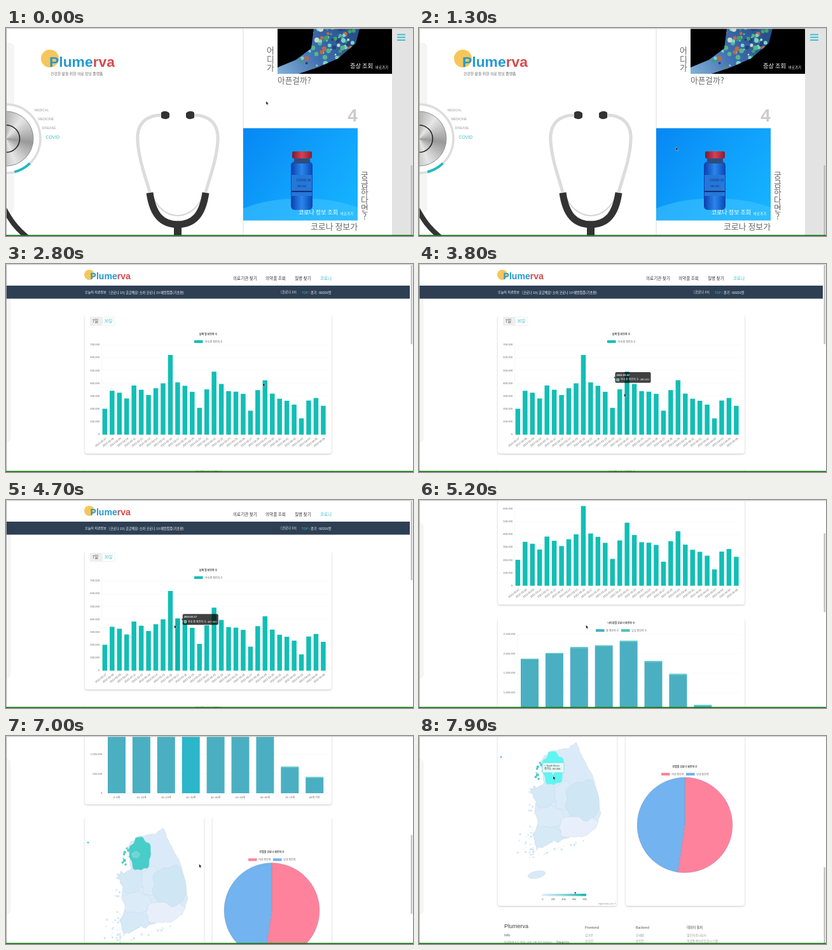
An HTML page with a canvas for the animation above (8 s loop, 640 by 327 pixels).

```html
<!DOCTYPE html>
<html lang="ko">
<head>
<meta charset="utf-8">
<title>Health dashboard</title>
<style>
html, body { margin: 0; width: 100%; height: 100%; overflow: hidden; background: #fff; }
canvas { display: block; width: 640px; height: 327px; }
</style>
</head>
<body>
<canvas id="stage"></canvas>
<script>
const W = 640, H = 327, LOOP = 8000;
const PAGE_AT = 1450, DATA_AT = 1916;
const canvas = document.getElementById('stage');
const c = canvas.getContext('2d');
const dpr = Math.max(1, window.devicePixelRatio || 1);
canvas.width = W * dpr;
canvas.height = H * dpr;

const KR = '"Noto Sans CJK KR", "Noto Sans CJK", sans-serif';
const LATIN = '"Liberation Sans", "Noto Sans CJK KR", sans-serif';
const TEAL = '#12beb5', LINK = '#35bccb', STEEL = '#4bafc2';
const BRAND = ['Plume', 'rva'];

const clamp = v => Math.max(0, Math.min(1, v));
const smooth = v => { v = clamp(v); return v * v * (3 - 2 * v); };
const outQuart = v => 1 - (1 - clamp(v)) ** 4;
const mix = (a, b, p) => a + (b - a) * p;

function seeded(seed) {
  return () => (seed = (seed * 16807) % 2147483647) / 2147483647;
}

/* ---------- Motion ---------- */

const stops = [[0, 409, 115], [900, 404, 187], [3000, 404, 187], [4040, 310, 206], [4800, 262.5, 196],
  [6350, 262.5, 199], [6400, 303, 202], [7350, 304, 201], [7800, 211, 63]];

function pointer(t) {
  const i = stops.findLastIndex(s => s[0] <= t);
  const a = stops[Math.max(0, i)], b = stops[i + 1] || a;
  const p = smooth((t - a[0]) / (b[0] - a[0] || 1));
  return [mix(a[1], b[1], p), mix(a[2], b[2], p)];
}

const scrolls = [{ at: 4850, time: 546, by: 188.5 }, { at: 6550, time: 777, by: 353.5 }];
const scrollAt = t => scrolls.reduce((y, s) => y + s.by * smooth((t - s.at) / s.time), 0);
const restScroll = t => scrolls.reduce((y, s) => y + (t >= s.at + s.time ? s.by : 0), 0);

/* ---------- Drawing helpers ---------- */

function rect(x, y, w, h, color) {
  c.fillStyle = color;
  c.fillRect(x, y, w, h);
}

function paint(path, fill, line, width = 0.5) {
  if (fill) { c.fillStyle = fill; c.fill(path); }
  if (line) { c.strokeStyle = line; c.lineWidth = width; c.stroke(path); }
}

function round(x, y, w, h, r, fill, line) {
  const p = new Path2D();
  p.roundRect(x, y, w, h, r);
  paint(p, fill, line);
}

function oval(x, y, rx, ry, fill, line, turn = 0) {
  const p = new Path2D();
  p.ellipse(x, y, rx, ry, turn, 0, 7);
  paint(p, fill, line);
}

const disc = (x, y, r, color) => oval(x, y, r, r, color);

function ring(x, y, r, width, color, from = 0, to = Math.PI * 2) {
  const p = new Path2D();
  p.arc(x, y, r, from, to);
  paint(p, null, color, width);
}

const curve = (d, width, color) => paint(new Path2D(d), null, color, width);
const shape = (points, fill, line) => paint(new Path2D('M' + points + 'Z'), fill, line);

function text(s, x, y, size, color, { align = 'left', weight = 400, font = KR } = {}) {
  c.font = `${weight} ${size}px ${font}`;
  c.textAlign = align;
  c.textBaseline = 'middle';
  c.fillStyle = color;
  c.fillText(s, x, y);
  return c.measureText(s).width;
}

function gradient(x0, y0, x1, y1, ...colors) {
  const g = c.createLinearGradient(x0, y0, x1, y1);
  colors.forEach((k, i) => g.addColorStop(i / (colors.length - 1), k));
  return g;
}

function brand(x, y, size) {
  const style = { weight: 700, font: LATIN };
  const w = text(BRAND[0], x, y, size, '#2399d3', style);
  text(BRAND[1], x + w, y, size, '#d5494c', style);
}

/* ---------- Landing page ---------- */

function dial() {
  curve('M-4 282C6 300 14 314 37 332', 8, '#333');
  disc(0, 174, 55, '#fff');
  ring(0, 174, 54, 3.5, '#dcdcdc');
  ring(0, 174, 54, 3.8, '#1fb9bf', 0.8, 1.32);
  const metal = c.createConicGradient(-0.9, 0, 174);
  for (let i = 0; i <= 6; i++) metal.addColorStop(i / 6, i % 2 ? '#999' : '#e6e6e6');
  disc(0, 174, 43, metal);
  ring(0, 174, 43, 1, '#8c8c8c');
  ring(0, 174, 21.5, 1.6, '#222');
  ['MEDICAL', 'MEDICINE', 'DISEASE', 'COVID'].forEach((s, i) => {
    const on = i === 3;
    text(s, 45 + i * 5.8, 130 + i * 14, on ? 6.9 : 5, on ? LINK : '#999', { font: LATIN });
  });
}

function stethoscope() {
  for (const side of [1, -1]) {
    c.save();
    c.translate(270, 0);
    c.scale(side, 1);
    curve('M-26 137C-50 137-65 151-63 178C-61 208-50 236-44 258', 5, '#dcdcdc');
    curve('M-42 258C-34 283-16 295 0 295', 2, '#d6d6d6');
    curve('M-44 259C-39 294-25 309 1 309', 11, '#333');
    paint(new Path2D('M-26 133C-22 129-15 131-13 134L-13 140C-15 144-22 144-26 141Z'), '#333');
    c.restore();
  }
  rect(264, 306, 12, 21, '#333');
}

function vertical(s, x, y, step) {
  [...s].forEach((ch, i) => text(ch, x, y + i * step, 12.8, '#666', { align: 'center', weight: 300 }));
}

function armPicture() {
  rect(427, 1, 180, 71, '#000');
  c.save();
  c.clip(new Path2D('M427 72L427 62L456 50L480 32L484 1L556 1L550 24L522 48L490 62L460 72Z'));
  rect(427, 1, 180, 71, gradient(430, 70, 540, 5, '#7faed6', '#3f6fb0', '#28508c'));
  const rnd = seeded(77);
  const tones = ['#56b58b', '#7ed3c8', '#22447c', '#c8dcca', '#b86a4e', '#3da26a'];
  for (let i = 0; i < 110; i++) {
    const x = rnd();
    disc(462 + x * 94, rnd() * 66, 1 + rnd() * 3, tones[i % 6]);
  }
  c.restore();
  text('증상 조회', 541, 60, 9.2, '#fff', { weight: 500 });
  text('바로가기', 581, 62, 5.4, '#fff');
}

function vialPicture() {
  rect(373, 157.5, 180, 145, gradient(373, 157, 553, 302, '#0687f3', '#0fa0fc', '#17b6ff'));
  c.save();
  c.beginPath();
  c.rect(373, 157.5, 180, 145);
  c.clip();
  oval(465, 312, 120, 44, 'rgba(70,200,255,.5)');
  c.restore();
  round(448, 210, 34, 76, 6, gradient(448, 0, 482, 0, '#0a3dac', '#2a86ec', '#0a45b4'));
  round(453, 203, 25, 10, 2, '#2c4c80');
  round(450, 194, 31, 11, 2, gradient(450, 0, 481, 0, '#7c1730', '#d34256', '#8a1c32'));
  rect(449, 231, 32, 33, '#2577d8');
  text('COVID-19', 468, 240, 4.8, '#0c2f70', { align: 'center', font: LATIN });
  text('VACCINE', 465, 249, 3.2, '#0c2f70', { align: 'center', font: LATIN });
  rect(449, 256, 32, 2, '#0c2f70');
  text('코로나 정보 조회', 460, 289.5, 9, '#fff', { weight: 500 });
  text('바로가기', 526, 291.5, 5.4, '#fff');
}

function landing() {
  round(-10, 24, 22, 266, 6, '#f5f5f5', '#e7e7e7');
  disc(69, 48, 14, '#f7c65a');
  brand(68, 55, 22.9);
  text('건강한 삶을 위한 의료 정보 플랫폼', 70, 72, 5.9, '#666');
  dial();
  stethoscope();
  rect(372.5, 0, 1, H, '#dedede');
  rect(607, 0, 33, H, '#e3e3e3');
  for (let i = 0; i < 3; i++) rect(615, 9.5 + i * 4.3, 13, 1.8, LINK);
  armPicture();
  vertical('어디가', 416, 35.5, 13.5);
  text('아픈걸까?', 427, 82, 12.7, '#666', { weight: 300 });
  text('4', 545, 139.5, 28, '#cbcbcb', { align: 'center', weight: 700, font: LATIN });
  vialPicture();
  vertical('궁금하다면?', 564, 231, 13.1);
  text('코로나 정보가', 479, 312, 12.9, '#666', { weight: 300 });
  rect(636.5, 216, 2.5, 110, '#bdbdbd');
}

/* ---------- Charts ---------- */

const thousands = n => Math.round(n).toLocaleString('en-US');

// Daily cases in thousands, age groups in millions
const daily = [202, 342, 327, 282, 383, 350, 309, 362, 400, 621, 407, 381, 334, 209, 353,
  490.821, 395, 339, 335, 318, 187, 347, 424, 320, 280, 264, 234, 127, 266, 286, 224.82];
const ages = [1.846, 1.993, 2.149, 2.191683, 2.31, 1.79, 1.459, 0.662, 0.396];

const dayChart = {
  values: daily, x0: 155.4, step: 11.45, width: 7.5, base: 268.3, scale: 0.2018,
  tip: 56, unit: 1000, label: '국내 총 확진자 수: ', color: TEAL, lit: '#08b4ab',
  name: i => new Date(Date.UTC(2022, 2, 7 + i)).toISOString().slice(0, 10)
};
const ageChart = {
  values: ages, x0: 174, step: 38.9, width: 28, base: 497.5, scale: 61.2,
  tip: 51, unit: 1e6, label: '총 확진자 수: ', color: STEEL, lit: '#2cb6ca',
  name: i => i === 8 ? '80세 이상' : i ? `${i}0~${i}9세` : '0~9세'
};

const barX = (ch, i) => ch.x0 + i * ch.step;
const barTop = (ch, i) => ch.base - ch.values[i] * ch.scale;

function hit(ch, t) {
  if (t < 3000) return -1;
  const [x, y] = pointer(t), i = Math.round((x - ch.x0) / ch.step), py = y + restScroll(t);
  const inside = i in ch.values && Math.abs(x - barX(ch, i)) <= ch.width / 2
    && py >= barTop(ch, i) && py <= ch.base;
  return inside ? i : -1;
}

// Looks back in time for the bar under the pointer and the one before it
function hover(ch, t) {
  let now = -1, was = -1, age = 0, hits = 0;
  for (let k = 0; k < 60 && was < 0; k++) {
    const i = hit(ch, t - k * 10);
    if (i < 0) continue;
    if (k < 10) hits++;
    if (now < 0) now = i;
    if (i === now) age = k * 10; else was = i;
  }
  if (was < 0) was = now;
  return { now, was, p: outQuart((age + 5) / 400), alpha: clamp(hits / 5) };
}

function tooltip(ch, h) {
  if (!h.alpha) return;
  const last = ch.values.length - 1;
  const onLeft = i => i <= last / 2;
  const boxX = i => barX(ch, i) + (onLeft(i) ? 6 : -6 - ch.tip);
  const x = mix(boxX(h.was), boxX(h.now), h.p);
  const y = mix(barTop(ch, h.was), barTop(ch, h.now), h.p) + 0.8;
  const side = onLeft(h.now) ? -1 : 1, edge = side < 0 ? x : x + ch.tip;
  c.save();
  c.globalAlpha = h.alpha;
  round(x, y - 8.5, ch.tip, 16.8, 2, 'rgba(0,0,0,.75)');
  shape(`${edge} ${y - 2}L${edge + side * 2} ${y}L${edge} ${y + 2}`, 'rgba(0,0,0,.75)');
  text(ch.name(h.now), x + 2, y - 3.5, 4, '#fff', { weight: 700, font: LATIN });
  rect(x + 2, y + 1.5, 4.2, 4.2, '#fff');
  rect(x + 2.5, y + 2, 3.2, 3.2, ch.color);
  text(ch.label + thousands(ch.values[h.now] * ch.unit), x + 8, y + 3.8, 4, '#fff', { font: LATIN });
  c.restore();
}

function bars(ch, t, h, each) {
  const grow = outQuart((t - DATA_AT) / 1000);
  const lit = !h.alpha ? -1 : h.p < 0.4 ? h.was : h.now;
  ch.values.forEach((v, i) => {
    const x = barX(ch, i), height = v * ch.scale * grow;
    rect(x - ch.width / 2, ch.base - height, ch.width, height, i === lit ? ch.lit : ch.color);
    each(i, x, ch.base - height);
  });
  tooltip(ch, h);
}

function card(x, y, w, h) {
  c.save();
  c.shadowColor = 'rgba(0,0,0,.22)';
  c.shadowBlur = 3 * dpr;
  c.shadowOffsetY = dpr;
  round(x, y, w, h, 4, '#fff');
  c.restore();
  rect(x, y - 2, w, 5, '#fff');
}

function legend(x, y, color, label) {
  rect(x, y - 2.1, 13.5, 4.2, color);
  text(label, x + 16.3, y, 4, '#666');
}

const heading = (s, x, y) => text(s, x, y, 4, '#444', { align: 'center', weight: 700 });

function axis(x0, x1, base, step, unit, count) {
  for (let i = 0; i <= count; i++) {
    const y = base - i * step;
    rect(x0 - 3, y, x1 - x0 + 3, 0.4, '#f3f3f3');
    text(thousands(i * unit), x0 - 3.3, y, 4.15, '#666', { align: 'right', font: LATIN });
  }
  rect(x0, base - count * step, 0.4, count * step, '#ededed');
}

function dayCard(t) {
  card(124, 80, 388, 218);
  rect(132, 83, 19, 14, '#eee');
  round(151.5, 83.3, 19.5, 13.4, 1, '#fff', '#ddd');
  text('7일', 140.5, 90, 6.4, '#444', { align: 'center' });
  text('30일', 161, 90, 6.4, LINK, { align: 'center' });
  heading('날짜 별 확진자 수', 318, 110.5);
  legend(296, 122, TEAL, '국내 총 확진자 수');
  if (t < DATA_AT) return;
  axis(150.5, 506, 268.3, 20.18, 100000, 7);
  bars(dayChart, t, hover(dayChart, t), (i, x) => {
    c.save();
    c.translate(x + 2.3, 274);
    c.rotate(-0.65);
    text(dayChart.name(i), 0, 0, 4.15, '#666', { align: 'right', font: LATIN });
    c.restore();
  });
}

function ageCard(t) {
  card(124, 320, 388, 195);
  heading('나이대별 코로나 확진자 수', 318, 327.5);
  legend(278, 338.7, STEEL, '총 확진자 수');
  legend(318, 338.7, '#4bc3bd', '일일 확진자 수');
  axis(154.5, 505, 497.5, 30.6, 500000, 5);
  bars(ageChart, t, hover(ageChart, t), (i, x, top) => {
    rect(x - 14, top - 1.4, 28, 1.4, '#4bc3bd');
    text(ageChart.name(i), x, 504, 4.1, '#666', { align: 'center', font: LATIN });
  });
}

function pie() {
  const start = -Math.PI / 2, split = start + Math.PI * 2 * 0.5235;
  heading('성별별 코로나 확진자 수', 418, 590.3);
  legend(381, 602, '#ff829c', '여성 확진자');
  legend(420, 602, '#72b3f0', '남성 확진자');
  [['#ff829c', start, split], ['#72b3f0', split, start + Math.PI * 2]].forEach(([k, a, b]) => {
    const p = new Path2D();
    p.moveTo(418, 682);
    p.arc(418, 682, 75, a, b);
    p.closePath();
    paint(p, k, 'rgba(120,120,150,.5)');
  });
}

/* ---------- Map ---------- */

const EDGE = '#c5d7e4';
const outline = '203,25 222,21 235,20 247,10 257,34 272,60 281,90 286,122 277,146 258,158 240,158 '
  + '224,163 206,168 184,180 181,152 187,132 181,98 177,84 197,73 193,51 194,36';

// Splits each edge and jitters it, more on the western side
function coast(points) {
  const rnd = seeded(19), p = new Path2D();
  const pts = points.split(' ').map(s => s.split(',').map(Number));
  pts.forEach(([x, y], i) => {
    const [u, v] = pts[(i + 1) % pts.length];
    const rough = x < 240 && y > 30 ? 6 : 1.5;
    for (let k = 0; k < 5; k++) {
      const j = k ? rough : 0;
      p.lineTo(mix(x, u, k / 5) + (rnd() - 0.5) * j, mix(y, v, k / 5) + (rnd() - 0.5) * j);
    }
  });
  p.closePath();
  return p;
}

function province(x, y, rx, ry) {
  const p = new Path2D();
  for (let i = 0; i < 40; i++) {
    const a = i / 40 * Math.PI * 2;
    const r = 1 + 0.07 * Math.sin(a * 5 + x) + 0.05 * Math.sin(a * 9 + y);
    p.lineTo(x + rx * r * Math.cos(a), y + ry * r * Math.sin(a));
  }
  p.closePath();
  return p;
}

const land = coast(outline);
const capital = province(211, 51, 17, 26);
const provinces = [
  ['#d5e9f6', 198, 162, 29, 24], ['#e9effa', 253, 143, 33, 20], ['#dcebf8', 204, 127, 23, 17],
  ['#d4e8f6', 195, 92, 23, 20], ['#dcebf8', 229, 94, 16, 23], ['#cfe6f4', 259, 101, 29, 31]
].map(([color, ...box]) => [color, province(...box)]);

function koreaMap(t) {
  c.save();
  c.translate(0, 542);
  const rnd = seeded(41);
  for (let i = 0; i < 60; i++) {
    const a = rnd(), b = rnd(), r = 0.5 + rnd() * 1.4;
    if (i < 34) disc(180 - a * b * 30, 140 + rnd() * 52, r, '#d3e6f4');
    else if (i < 50) disc(190 + a * 70, 184 - a * 22 + b * 6, r, '#d3e6f4');
    else disc(170 + a * 12, 78 + b * 40, r, '#d3e6f4');
  }
  paint(land, '#dbeaf8');
  c.save();
  c.clip(land);
  provinces.forEach(([color, p]) => paint(p, color, EDGE));
  c.restore();
  paint(land, null, EDGE);
  oval(185, 218, 14, 5.5, '#d8eaf7', EDGE, -0.2);

  const on = smooth((t - 7600) / 160);
  for (let i = 0; i < 9; i++) disc(181 + rnd() * 14, 42 + i * 3.2, 1 + rnd() * 1.5, '#48cdc8');
  disc(129, 33, 1.5, '#48cdc8');
  paint(capital, '#48cdc8', '#a9dadd');
  paint(province(204, 52, 6, 5), '#71d6d3', '#a9dadd');
  c.globalAlpha = on;
  paint(capital, '#5ff5f1', '#b5f5f3');
  c.globalAlpha = 1;

  rect(193, 248, 70, 3.6, gradient(193, 0, 263, 0, '#e6eefb', '#8bd5d8', '#10b5ac'));
  for (let i = 0; i < 5; i++) {
    text(i ? i * 20 + 'k' : '0', 194.3 + i * 16.6, 257.3, 4, '#555', { align: 'center', font: LATIN });
  }
  c.globalAlpha = on;
  shape('244,245.5 247.5,245.5 245.8,248.5', '#444');
  round(194, 42, 34, 15.8, 1.2, 'rgba(247,250,250,.88)', '#48cdc8');
  shape('209,57.8 213,57.8 211,60.5', '#f1fafa');
  disc(198, 46.8, 0.8, '#48cdc8');
  text('South Korea', 200.5, 46.8, 3.6, '#333', { font: LATIN });
  text('경기도: 60 256', 197, 52.2, 4, '#222', { weight: 500, font: LATIN });
  c.globalAlpha = 1;
  text('Highcharts.com ©', 310, 264.5, 3.5, '#888', { align: 'right', font: LATIN });
  c.restore();
}

/* ---------- Dashboard ---------- */

const tickerLeft = ['심화편', '기초편'].map(s => `[코로나 19] 궁금해요! 소아 코로나 19 예방접종(${s})`);
const tickerRight = [[460, '일일 확진자', ' : 224820명'], [465, 'TOP', ' : 경기 : 60256명']];

function header(t) {
  disc(131, 17, 8, '#f7c65a');
  brand(132.5, 20.5, 14.1);
  text('의료기관 찾기', 357, 22, 6.6, '#333');
  text('의약품 조회', 408, 22, 6.6, '#333');
  text('질병 찾기', 454, 22, 6.6, '#333');
  text('코로나', 494, 22, 6.6, LINK);
  rect(0, 34, 635, 20.5, '#2e3f54');
  text('오늘의 의료정보', 124, 44, 5.1, '#fff');
  text('[코로나 19]', 432, 44, 5.2, '#fff');
  c.save();
  c.beginPath();
  c.rect(0, 37, W, 15);
  c.clip();
  const slide = smooth((t - 1945) / 500) * 11;
  for (let i = 0; i < 2; i++) {
    const y = 45 + i * 11 - slide;
    if (Math.abs(y - 45) > 10.5) continue;
    text(tickerLeft[i], 162, y, 5.2, '#fff');
    const [x, key, rest] = tickerRight[i];
    const w = text(key, x, y, 5.2, LINK);
    text(rest, x + w, y, 5.2, '#fff');
  }
  c.restore();
}

function footer() {
  text(BRAND.join(''), 134, 841.5, 9, '#444', { font: LATIN });
  text('Info', 134, 855, 5.2, '#444', { weight: 500 });
  const w = text('NORVA 6기 특화 구미 1반 8조 Veltoo', 134, 866, 4.8, '#999');
  text('Email Us', 134 + w + 7, 866, 4.8, '#555', { weight: 500 });
  [['Frontend', '김가온', '오다린'], ['Backend', '한새봄', '문이든'],
    ['데이터 출처', '열린자료나눔터', '의료통계자료모음시스템']].forEach(([head, ...items], i) => {
    const x = 261 + i * 80;
    text(head, x, 843, 5.2, '#444', { weight: 500 });
    items.forEach((s, k) => text(s, x, 855.3 + k * 9, 4.8, '#999'));
  });
}

function dashboard(t) {
  const y = scrollAt(t);
  round(-10, 36, 16.5, 244, 6, '#f5f5f5', '#e9e9e9');
  c.save();
  c.translate(0, -y);
  header(t);
  dayCard(t);
  ageCard(t);
  card(124, 535, 187, 274);
  card(325, 535, 187, 274);
  koreaMap(t);
  pie();
  footer();
  c.restore();
  rect(636.5, 2 + y * 0.377, 2.5, 124, '#c3c3c3');
}

function cursor(t) {
  c.save();
  c.translate(...pointer(t));
  paint(new Path2D('M0 0L0 5.6L1.3 4.4L2.3 6.5L3.2 6.1L2.2 4L4 4Z'), '#111', '#fff', 0.4);
  c.restore();
}

function draw(t) {
  c.setTransform(dpr, 0, 0, dpr, 0, 0);
  rect(0, 0, W, H, '#fff');
  if (t < PAGE_AT) landing(); else dashboard(t);
  rect(0, 0, 1, H, '#a5a5a5');
  rect(0, 0, W, 1.4, '#cfcfcf');
  cursor(t);
  rect(0, 325.3, W, 1.7, '#1c781c');
}

const begin = performance.now();
function loop() {
  draw((performance.now() - begin) % LOOP);
  requestAnimationFrame(loop);
}
loop();
</script>
</body>
</html>
```
